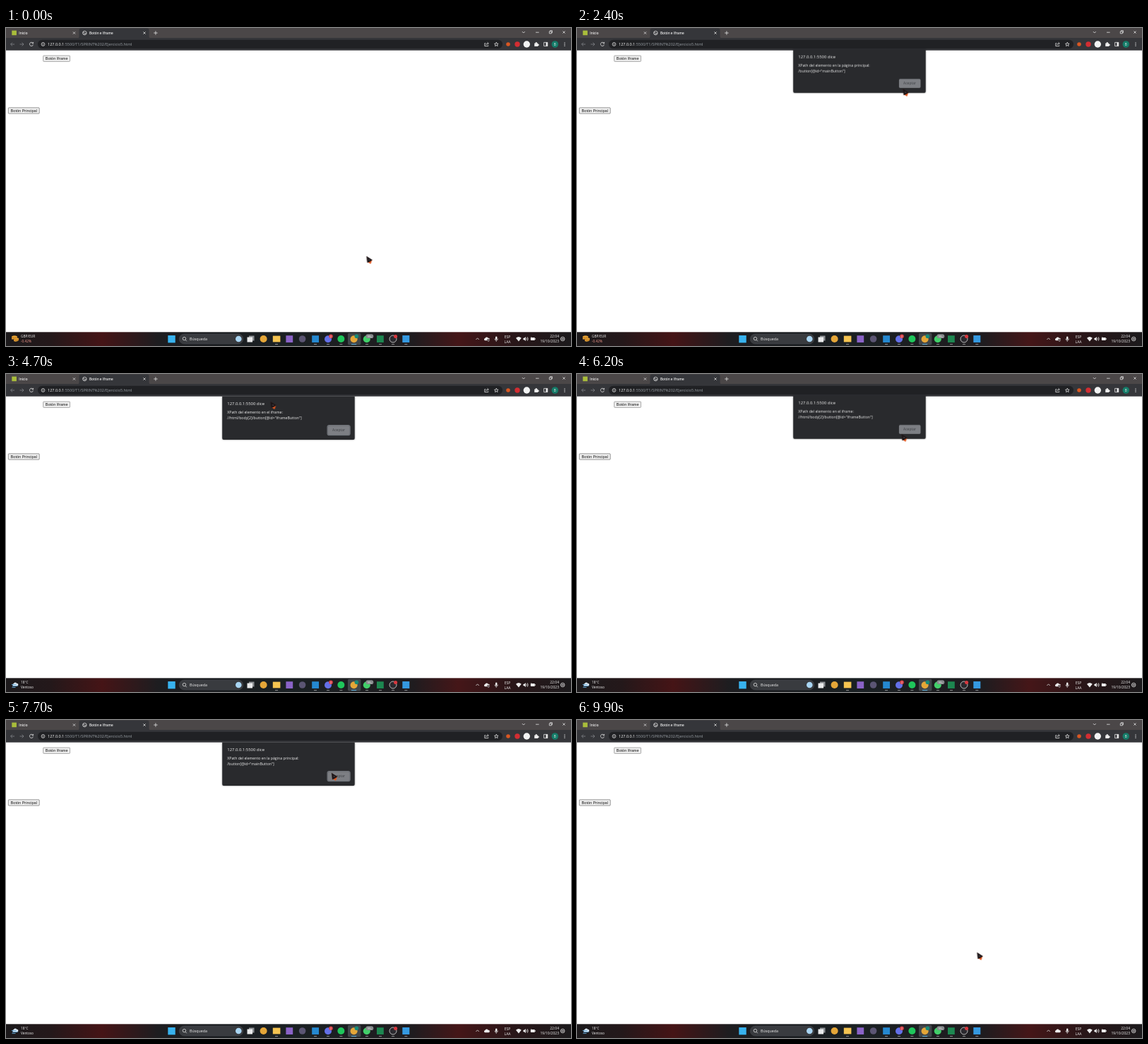
An HTML page that plays this animation: 800 px wide and 450 px high, repeating every 10000 ms.

```html
<!DOCTYPE html>
<html lang="es">
<head>
<meta charset="utf-8">
<title>Botón e Iframe</title>
<style>
html, body { margin: 0; width: 100%; height: 100%; overflow: hidden; background: #fff; }
svg { display: block; width: 100vw; height: 100vh; }
text { font: 5px "Open Sans", "Noto Sans", sans-serif; fill: #f1f1f1; }
.tab { font-size: 4.7px; font-weight: 600; }
.url { font-size: 5.5px; fill: #9aa0a6; }
.host { fill: #fff; }
.page text { font: 5.55px "Liberation Sans", Arial, sans-serif; fill: #111; }
.page rect { fill: #efefef; stroke: #767676; stroke-width: .6; }
.msg { font-size: 5.2px; }
.small { font-size: 4.75px; font-weight: 500; }
.line { fill: none; stroke: #e3e3e3; stroke-width: .8; }
.dim { stroke: #85878b; }

.cursor, .dialog, .ring, .main, .inner, .rates, .wind, .sync { animation: 10s step-end infinite; }
.cursor { animation-name: move; }
.dialog { animation-name: dialog; filter: drop-shadow(0 .8px 1px #0007); }
.ring { animation-name: ring; }
.main { animation-name: main; }
.inner { animation-name: inner; }
.rates { animation-name: rates; }
.wind { animation-name: wind; }
.sync { animation-name: sync; }

/* The picture advances every 100 ms, so each leg is stepped. */
@keyframes move {
  0%   { transform: translate(510.5px, 323px); animation-timing-function: steps(4); }
  4%   { transform: translate(290px, 215px); animation-timing-function: steps(4); }
  8%   { transform: translate(60px, 125px); animation-timing-function: steps(2); }
  10%  { transform: translate(27px, 114px); }
  13%  { transform: translate(27px, 114px); animation-timing-function: steps(4); }
  17%  { transform: translate(290px, 92px); animation-timing-function: steps(3); }
  20%  { transform: translate(452px, 79px); animation-timing-function: steps(2); }
  22%  { transform: translate(464px, 76px); }
  24%  { transform: translate(461.5px, 86px); animation-timing-function: steps(5); }
  29%  { transform: translate(270px, 98px); animation-timing-function: steps(5); }
  34%  { transform: translate(90px, 52px); animation-timing-function: steps(2); }
  36%  { transform: translate(74.5px, 42.5px); }
  43%  { transform: translate(74.5px, 42.5px); animation-timing-function: steps(4); }
  47%  { transform: translate(374.5px, 39px); animation-timing-function: steps(8); }
  55%  { transform: translate(441px, 62px); animation-timing-function: steps(4); }
  59%  { transform: translate(463px, 76px); }
  62%  { transform: translate(459.5px, 85px); animation-timing-function: steps(4); }
  66%  { transform: translate(120px, 115px); animation-timing-function: steps(2); }
  68%  { transform: translate(25px, 114px); }
  72%  { transform: translate(25px, 114px); animation-timing-function: steps(3); }
  75%  { transform: translate(320px, 92px); animation-timing-function: steps(2); }
  77%  { transform: translate(461px, 75px); }
  82%  { transform: translate(461px, 75px); animation-timing-function: steps(5); }
  87%  { transform: translate(548px, 155px); animation-timing-function: steps(5); }
  92%  { transform: translate(494.5px, 182.5px); }
  95%  { transform: translate(494.5px, 182.5px); animation-timing-function: steps(4); }
  99%, 100% { transform: translate(566.5px, 329px); }
}
@keyframes dialog {
  0%, 25%, 63%, 83%, 100% { opacity: 0; transform: none; }
  12%, 41%, 71% { opacity: 1; transform: none; }
  24%, 62%, 82% { opacity: 1; transform: translateY(-1.2px); }
}
@keyframes ring {
  0%, 41%, 71%, 100% { opacity: 1; }
  24%, 62%, 82% { opacity: 0; }
}
@keyframes main { 0%, 65%, 100% { opacity: 1; } 30% { opacity: 0; } }
@keyframes inner { 0%, 65%, 100% { opacity: 0; } 30% { opacity: 1; } }
@keyframes rates { 0% { opacity: 1; } 40%, 100% { opacity: 0; } }
@keyframes wind { 0% { opacity: 0; } 40%, 100% { opacity: 1; } }
@keyframes sync { 0% { opacity: 1; } 68%, 100% { opacity: 0; } }
</style>
</head>
<body>
<svg viewBox="0 0 800 450" preserveAspectRatio="none">
<defs>
  <linearGradient id="bar">
    <stop offset="0" stop-color="#1c1a1c"/>
    <stop offset=".08" stop-color="#24181a"/>
    <stop offset=".17" stop-color="#451416"/>
    <stop offset=".27" stop-color="#1d1d20"/>
    <stop offset=".5" stop-color="#1a2023"/>
    <stop offset=".72" stop-color="#1f1c1f"/>
    <stop offset=".8" stop-color="#451618"/>
    <stop offset=".9" stop-color="#281618"/>
    <stop offset="1" stop-color="#1c1a1c"/>
  </linearGradient>
  <path id="x" d="M-1.6-1.6 1.6 1.6M1.6-1.6-1.6 1.6"/>
  <path id="cloud" d="M-3 2.2a1.6 1.6 0 0 1 .4-3.1 2.2 2.2 0 0 1 4.2-.3 1.7 1.7 0 0 1 1 3.4z"/>
</defs>

<rect width="800" height="450" fill="#fff"/>

<!-- Tab strip -->
<rect width="800" height="14.5" fill="#4b4748"/>
<path d="M101 14.5q2.5 0 2.5-3V3q0-2.5 2.5-2.5h94q2.5 0 2.5 2.5v8.5q0 3 2.5 3z" fill="#35363a"/>
<rect x="8.3" y="3.6" width="6.6" height="6.6" fill="#a9bd3b"/>
<text class="tab" x="18.3" y="8.7">Inicio</text>
<g class="line">
  <circle cx="111.3" cy="7" r="2.7"/>
  <path d="M109 6q2 0 2.2 1.3t2.4.4M110 8.7l1.5.6"/>
</g>
<text class="tab" x="118" y="8.7">Botón e Iframe</text>
<g class="line">
  <use href="#x" x="96.5" y="7"/>
  <use href="#x" x="196" y="7"/>
  <path d="M209.2 7h5.4M211.9 4.3v5.4M730.8 5l2 2 2-2M750 6.2h4.6"/>
  <path d="M769.3 4.8h3v3h-3zM770.4 4.6V3.7h3v3h-.9"/>
  <use href="#x" x="790" y="6"/>
</g>

<!-- Toolbar -->
<rect y="14" width="800" height="17.7" fill="#35363a"/>
<rect x="45" y="16.8" width="658" height="12.4" rx="6.2" fill="#202124"/>
<path class="line dim" d="M12 23H6.6m2.4-2.4L6.6 23 9 25.4M19.5 23H25m-2.4-2.4L25 23l-2.4 2.4"/>
<path class="line" d="M38 21.2a2.6 2.6 0 1 0 .5 2.4M38.6 19.9v2h-2"/>
<circle class="line" cx="52.5" cy="23" r="2.4"/>
<path class="line" d="M52.5 22.6v1.8M52.5 21.3v.6"/>
<text class="url" x="59" y="25"><tspan class="host">127.0.0.1</tspan>:5500/T1/SPRINT%202/Ejercicio5.html</text>
<g class="line">
  <path d="M679.2 21.6h-1.4v4h5v-1.2M679.5 24q.3-2.2 3-2.2M681.6 20.3l1.7 1.6-1.7 1.5"/>
  <path d="M694.3 20.2l.8 1.9 2 .2-1.5 1.3.5 2-1.8-1.1-1.8 1.1.5-2-1.5-1.3 2-.2z"/>
</g>
<circle cx="711" cy="23" r="2.8" fill="#d95722"/>
<circle cx="724" cy="23" r="3.7" fill="#d32d32"/>
<circle cx="737.3" cy="23" r="4.7" fill="#f2f3f3"/>
<path d="M748.2 21.4h1.5a1.1 1.1 0 1 1 2.1 0h1.5v1.5a1.1 1.1 0 1 1 0 2.1v1h-5.1z" fill="#eee"/>
<path d="M761.6 20.4h5.2v5.2h-5.2z" class="line"/>
<path d="M764.5 20.4h2.3v5.2h-2.3z" fill="#eee"/>
<circle cx="777.3" cy="23" r="4.8" fill="#157c69"/>
<text x="777.3" y="24.7" text-anchor="middle" style="font-size:4.6px">B</text>
<g fill="#eee"><circle cx="791" cy="20.8" r=".65"/><circle cx="791" cy="23" r=".65"/><circle cx="791" cy="25.2" r=".65"/></g>

<!-- Page -->
<g class="page">
  <rect x="52.7" y="39.1" width="37.8" height="8.3" rx=".8"/>
  <text x="55.8" y="45.2">Botón Iframe</text>
  <rect x="3.3" y="112.8" width="43.9" height="8.3" rx=".8" style="stroke:#555"/>
  <text x="6.6" y="118.9">Botón Principal</text>
</g>

<!-- Alert -->
<g class="dialog">
  <path d="M306.2 31.7h187.5v59.2q0 2-2 2H308.2q-2 0-2-2z" fill="#292a2d"/>
  <text x="313.3" y="44" style="font-size:5.9px">127.0.0.1:5500 dice</text>
  <g class="main">
    <text class="msg" x="313.3" y="55.8">XPath del elemento en la página principal:</text>
    <text class="msg" x="313.3" y="64.3">/button[@id="mainButton"]</text>
  </g>
  <g class="inner">
    <text class="msg" x="313.3" y="55.8">XPath del elemento en el iframe:</text>
    <text class="msg" x="313.3" y="64.3">//html/body[2]/button[@id="iframeButton"]</text>
  </g>
  <rect class="ring" x="455" y="72.5" width="32.2" height="14.2" rx="2" fill="#55585e" stroke="#8d9199" stroke-width=".7"/>
  <rect x="455.9" y="73.3" width="30.6" height="12.6" rx="1.6" fill="#7d7f84"/>
  <text x="471.1" y="81.4" text-anchor="middle" style="fill:#3f4145">Aceptar</text>
</g>

<!-- Taskbar -->
<rect y="430.3" width="800" height="19.7" fill="url(#bar)"/>
<g class="rates">
  <path d="M8 436.5q4-2.5 8 0v2.3h2v3.2q-3.5 3-7 1v-2.5H8z" fill="#e7a234"/>
  <path d="M8 438q4 1.8 8 0M11 441q3.5 1.6 7 0" fill="none" stroke="#9c5d14" stroke-width=".7"/>
  <text class="small" x="21" y="438.1">GBP/EUR</text>
  <text class="small" x="21" y="445" style="fill:#f59a8c">-0.42%</text>
</g>
<g class="wind">
  <use href="#cloud" x="13.5" y="439" fill="#d7e2ec"/>
  <path d="M8 439.5h6.5M9 441.5h7.5M8.5 443.4h5" stroke="#69b1e4" stroke-width=".9"/>
  <text class="small" x="21" y="438.1">18°C</text>
  <text class="small" x="21" y="445">Ventoso</text>
</g>

<rect x="229.3" y="435" width="10.4" height="10.4" fill="#38b2ee"/>
<rect x="245.2" y="433" width="90.6" height="14" rx="7" fill="#393b3f" stroke="#505256" stroke-width=".4"/>
<path class="line" d="M254 441.3l1.8 1.9M254.6 439.6a2.2 2.2 0 1 1-4.4 0 2.2 2.2 0 0 1 4.4 0z"/>
<text x="260" y="442" style="font-size:5.3px">Búsqueda</text>
<circle cx="329.3" cy="440" r="4.3" fill="#a9d5f2"/>
<path d="M344 435.5h7.5v7H344z" fill="#8d9094"/>
<path d="M341.5 437.5h7.5v7h-7.5z" fill="#e9eaeb"/>

<rect x="484" y="431.8" width="18.4" height="16.6" rx="1.6" fill="#41464a"/>
<circle cx="364.6" cy="440" r="5" fill="#e5a638"/>
<rect x="377.8" y="435.6" width="10.6" height="8.8" fill="#f5c451"/>
<rect x="396.4" y="435.2" width="9.8" height="9.8" fill="#8a63c7"/>
<circle cx="419.6" cy="440" r="4.8" fill="#5b5573"/>
<rect x="433.2" y="435.2" width="9.8" height="9.8" fill="#2588d0"/>
<circle cx="456" cy="440.2" r="5" fill="#6470e8"/>
<circle cx="474.4" cy="440" r="5" fill="#1fc65b"/>
<circle cx="492.6" cy="440.2" r="5" fill="#e5a638"/>
<circle cx="510.8" cy="440.2" r="5" fill="#42cf69"/>
<rect x="525" y="435.2" width="9.8" height="9.8" fill="#1d8750"/>
<circle cx="548" cy="440" r="5" fill="#2b2a2f" stroke="#ddd" stroke-width=".8"/>
<rect x="561.3" y="435" width="10" height="10" fill="#3599e0"/>

<circle cx="460" cy="436.3" r="2.8" fill="#d94048"/>
<circle cx="496.4" cy="436.3" r="2.8" fill="#178a78"/>
<rect x="509.5" y="433.3" width="10.8" height="5.8" rx="2.9" fill="#86898c"/>
<circle cx="551.6" cy="436.4" r="2.5" fill="#d9373d"/>
<g text-anchor="middle">
  <text x="460" y="437.9" style="font-size:4px">2</text>
  <text x="515" y="437.7" style="font-size:3.8px">99+</text>
</g>
<path d="M381 447.6h4M436 447.6h4M454 447.6h4M472.4 447.6h4M509 447.6h4M528 447.6h4M546 447.6h4M564.3 447.6h4" stroke="#9a9a9c" stroke-width=".9"/>
<path d="M489 447.6h7.2" stroke="#62bdf0" stroke-width=".9"/>

<path class="line" d="M665.4 441l2.2-2.2 2.2 2.2"/>
<use href="#cloud" x="681" y="440" fill="#ededed"/>
<g class="sync">
  <circle cx="683" cy="441.8" r="2" fill="#30191b"/>
  <path class="line" d="M681.7 441.8a1.3 1.3 0 0 1 2.5-.4M684.3 442a1.3 1.3 0 0 1-2.5.4"/>
</g>
<rect x="693" y="436.4" width="2.4" height="4.5" rx="1.2" fill="#eee"/>
<path class="line" d="M692 439.6q0 2.4 2.2 2.4t2.2-2.4M694.2 442v1.8"/>
<g text-anchor="middle">
  <text x="710" y="438.5">ESP</text>
  <text x="710" y="445.5">LAA</text>
</g>
<path d="M722 438.7q3.9-3.2 7.8 0l-3.9 4.7z" fill="#eee"/>
<path d="M732.4 438.8h1.4l2-1.8v6l-2-1.8h-1.4z" fill="#eee"/>
<path class="line" d="M737 438.5q1.2 1.5 0 3M738.2 437.3q2.2 2.7 0 5.4"/>
<rect x="742.8" y="438" width="6" height="4" rx=".8" fill="#eee"/>
<path class="line" d="M749.5 439.2v1.6M743.5 437.2l1.4 1.7"/>
<g text-anchor="end">
  <text x="783" y="438.4">22:04</text>
  <text x="783" y="445.4">19/10/2023</text>
</g>
<circle class="line" cx="788.2" cy="440" r="2.8"/>
<path class="line" d="M786.6 439.3h3.2M786.6 440.8h3.2"/>

<!-- Pointer -->
<g class="cursor">
  <path d="M1.4 8 7.8 5 5.9 11.1z" fill="#e2571f"/>
  <path d="M0 0 8.1 5.2 4.8 7.4 1.1 9.1z" fill="#171316" stroke="#3b2422" stroke-width=".4"/>
  <path d="M2.6 3.2 5.4 5.3 2.8 6.6z" fill="#453b3d"/>
</g>
</svg>
</body>
</html>
```
